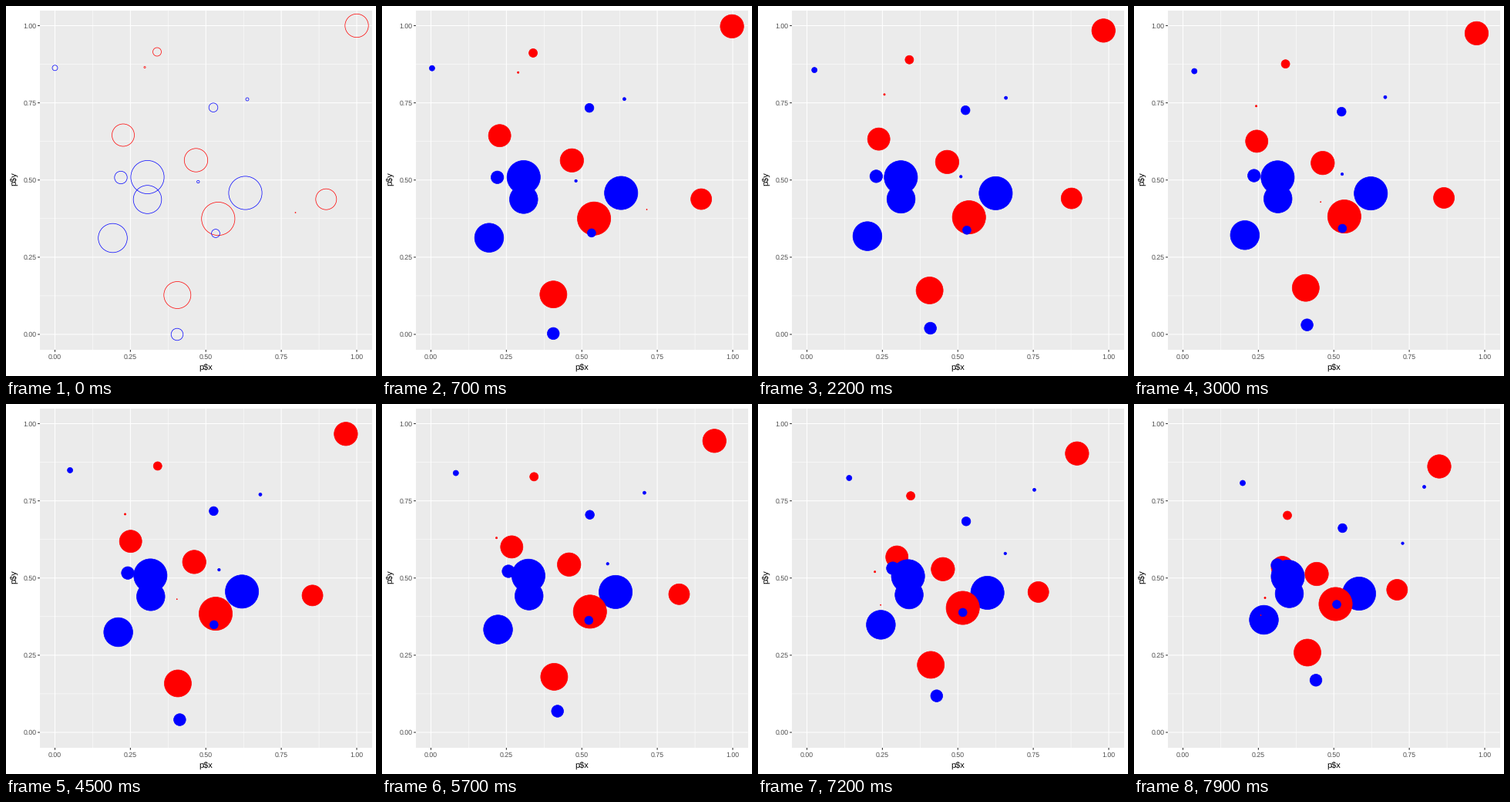
A matplotlib script that plays this animation: 480 px wide and 480 px high, repeating every 8000 ms.

```python
import numpy as np
import matplotlib.pyplot as plt
from matplotlib.animation import FuncAnimation
from matplotlib.patches import Circle, Rectangle

SIZE, DPI, FRAMES, STEP = 480, 100, 80, 100
PX = 72 / DPI
X0, X1, Y0, Y1 = 63.5, 455.0, 426.0, 25.5
LEFT, RIGHT, TOP, BOTTOM = 43.9, 474.6, 5.5, 446.0

plt.rcParams["font.family"] = "Liberation Sans"
plt.rcParams["text.hinting"] = "none"
fig = plt.figure(figsize=(SIZE / DPI, SIZE / DPI), dpi=DPI, facecolor="white")
ax = fig.add_axes([0, 0, 1, 1])
ax.set_xlim(0, SIZE)
ax.set_ylim(SIZE, 0)
ax.axis("off")


def line(xs, ys, color, width):
    ax.plot(xs, ys, color=color, lw=width * PX, snap=False,
            solid_capstyle="butt", zorder=1)


def label(x, y, text, size, color, ha="center", **kw):
    ax.text(x, y, text, fontsize=size * PX, color=color, ha=ha,
            parse_math=False, **kw)


# Grey panel, grid, ticks and axis titles
ax.add_patch(Rectangle((LEFT, TOP), RIGHT - LEFT, BOTTOM - TOP,
                       color="#EBEBEB", lw=0, zorder=0))
for width, first in ((0.53, 0.125), (1.07, 0)):
    for v in np.arange(first, 1.01, 0.25):
        x, y = X0 + v * (X1 - X0), Y0 + v * (Y1 - Y0)
        line([x, x], [TOP, BOTTOM], "white", width)
        line([LEFT, RIGHT], [y, y], "white", width)
        if width > 1:
            line([x, x], [BOTTOM, BOTTOM + 2.75], "#333333", width)
            line([LEFT - 2.75, LEFT], [y, y], "#333333", width)
            label(x, 458, f"{v:.2f}", 8.8, "#4D4D4D")
            label(39.4, y + 3.2, f"{v:.2f}", 8.8, "#4D4D4D", ha="right")
label((LEFT + RIGHT) / 2, 471.5, "p$x", 11, "black")
label(10.5, 224, "p$y", 11, "black", va="center", rotation=90)


class Body:
    """A disc falling from rest at start to end, optionally along an arc."""

    def __init__(self, color, r, start, end, bend=(0, 0)):
        self.color = color
        self.start, self.end, self.bend = map(np.array, (start, end, bend))
        self.power = 2 - 0.35 / r  # light bodies get going sooner
        self.disc = ax.add_patch(Circle(start, r, ec=color, lw=0.71 * PX,
                                        zorder=2))

    def move(self, s, filled):
        f = s ** self.power
        self.disc.center = tuple(self.start + (self.end - self.start) * f
                                 + self.bend * 4 * f * (1 - f))
        self.disc.set_facecolor(self.color if filled else "none")


# Back to front
bodies = [Body(*row) for row in (
    ("blue", 21.6, (310.5, 242.5), (292, 246)),
    ("blue", 18.8, (138.5, 301), (168.5, 280)),
    ("red", 15.2, (455, 25.5), (396, 81)),
    ("red", 5.5, (196, 59.5), (199, 144.5)),
    ("red", 1.1, (180, 79.5), (170, 251.5), (-27, 15)),
    ("red", 14.5, (152, 167.5), (192.5, 212)),
    ("red", 15.2, (246.5, 200), (237, 220.5)),
    ("red", 21.6, (275.3, 276), (261.5, 259.5)),
    ("red", 13.5, (415.3, 250.7), (341.3, 241)),
    ("red", 17.5, (222.3, 375), (225, 322.5)),
    ("red", 0.5, (375.5, 268), (164.5, 274), (-75, -18)),
    ("blue", 3.5, (63.5, 80.3), (141, 102.5)),
    ("blue", 5.8, (269, 131.7), (270.5, 161)),
    ("blue", 2.0, (313, 121), (376.5, 107.5)),
    ("blue", 8.2, (149, 222.5), (186, 209)),
    ("blue", 21.6, (183.5, 222), (199.5, 224)),
    ("blue", 18.3, (183.5, 251), (201.5, 246)),
    ("blue", 1.7, (249.3, 228), (348.5, 180.7)),
    ("blue", 5.4, (272, 295), (263, 260)),
    ("blue", 7.8, (222, 426), (236, 358.3)),
)]


def clock(t):
    """Shared progress: it slows midway, then quickens to the end."""
    return np.interp(t, [0, 1.5, 3, 4.5, 5.7, 7.2, 7.9],
                     [0, 0.262, 0.418, 0.485, 0.631, 0.833, 1])


def draw(i):
    s = clock(i * STEP / 1000)
    for body in bodies:
        body.move(s, filled=i > 0)
    return [body.disc for body in bodies]


anim = FuncAnimation(fig, draw, frames=FRAMES, interval=STEP, repeat=True,
                     repeat_delay=0, blit=False)
plt.show()
```
